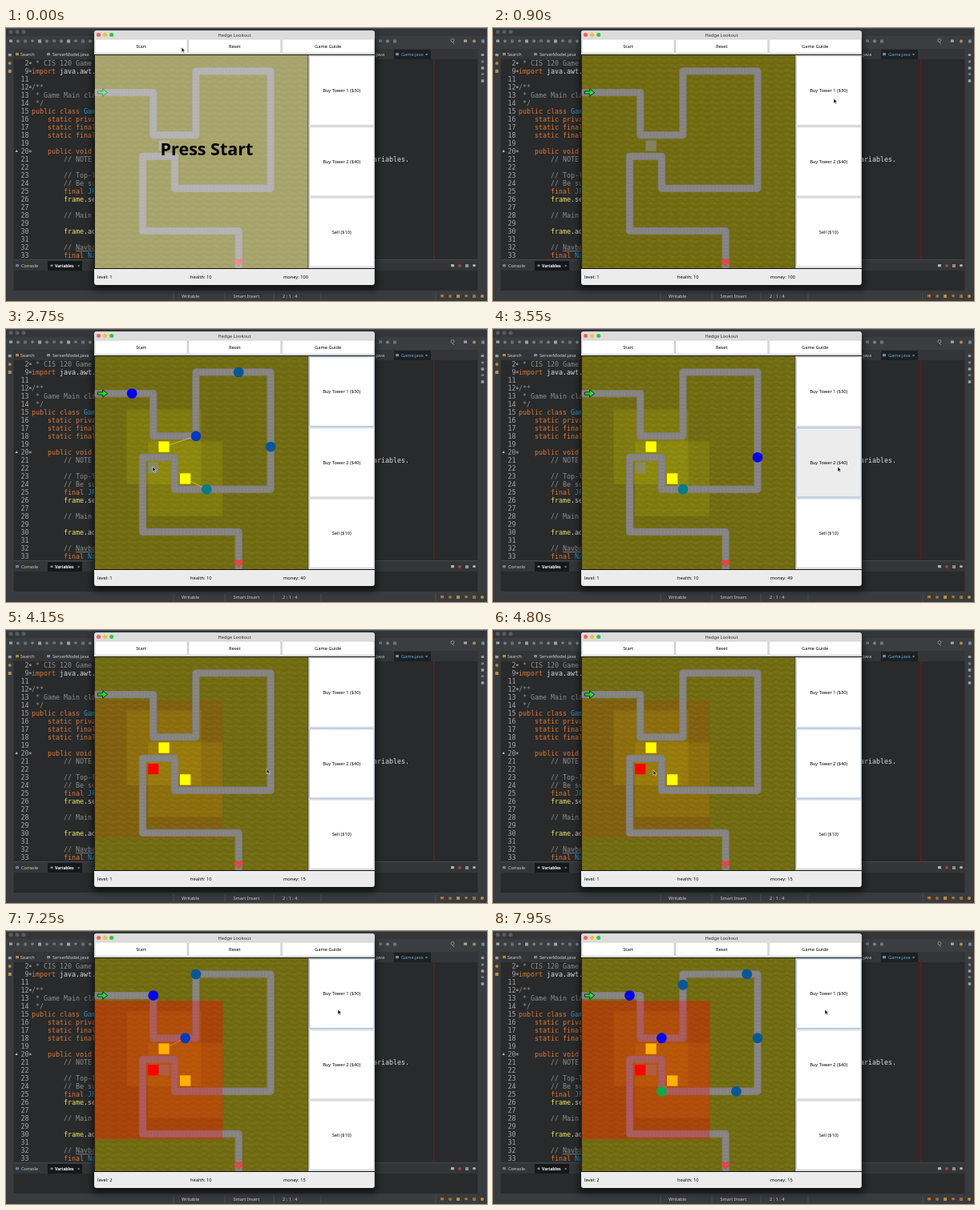
Animation, 600 px wide and 341 px high, one loop 8 s. Source, as an HTML page:

```html
<!DOCTYPE html>
<html lang="en">
<head>
<meta charset="utf-8">
<title>Hedge Lookout</title>
<style>
html, body { margin: 0; width: 100%; height: 100%; overflow: hidden; background: #292a2b; }
svg { display: block; width: 100vw; height: 100vh; }
text { font: 5.7px "Noto Sans", "Open Sans", sans-serif; white-space: pre; }
.code text { font: 8.3px "DejaVu Sans Mono", monospace; fill: #dcdcdc; }
.code .num { fill: #a6a9ab; text-anchor: end; }
.k { fill: #dd7a3a; } .t { fill: #2a9bcc; } .v { fill: #ece36c; } .c { fill: #8d8d8d; }
.ide text { fill: #d0d2d3; font-size: 5.6px; }
.mid { text-anchor: middle; }
#splash text { font: bold 21.5px "Noto Sans", "Open Sans", sans-serif; text-anchor: middle; }
</style>
</head>
<body>
<svg viewBox="0 0 600 341" preserveAspectRatio="none">
  <defs>
    <pattern id="grass" width="1" height="1" patternUnits="userSpaceOnUse">
      <rect width="1" height="1" fill="#736d13"/>
      <path d="M0 .2q.25 -.2 .5 0t.5 0M0 .7q.25 -.2 .5 0t.5 0" fill="none" stroke="#6a640f" stroke-width=".1"/>
      <path d="M.1 .45h.25M.6 .48h.25M.3 .93h.3" stroke="#7a7419" stroke-width=".1"/>
    </pattern>
    <filter id="blur" x="-10%" y="-10%" width="120%" height="120%"><feGaussianBlur stdDeviation="5"/></filter>
    <clipPath id="field"><rect width="20" height="20"/></clipPath>
  </defs>

  <g class="ide">
    <rect width="600" height="341" fill="#292a2b"/>
    <rect width="600" height="27" fill="#3b3e40"/>
    <rect width="600" height="10" fill="#343638"/>
    <rect width="600" height=".8" fill="#4a6180"/>
    <path d="M6 4.7h0M14 4.7h0M22 4.7h0" stroke="#5a5d5f" stroke-width="5" stroke-linecap="round"/>
    <rect y="26" width="600" height="13" fill="#333537"/>
    <rect x="484" y="27" width="46" height="12" fill="#1d2022"/>
    <rect y="26" width="9.5" height="303" fill="#393c3e"/>
    <rect x="588.5" y="26" width="11.5" height="303" fill="#393c3e"/>
    <rect x="533.3" y="39" width="1" height="251" fill="#7a1b1b"/>
    <rect x="9.5" y="289" width="579" height="1.5" fill="#45484a"/>
    <rect x="9.5" y="290.5" width="579" height="12.5" fill="#333537"/>
    <rect x="52" y="291" width="43" height="12" fill="#15181a"/>
    <rect y="328" width="600" height="13" fill="#393c3e"/>
    <path d="M209 330v10M273 330v10M334 330v10M393 330v10M536 330v10" stroke="#55585a" stroke-width=".7"/>
    <g id="icons"></g>
    <text x="18" y="35">Search</text>
    <text x="58" y="35">ServerModel.java</text>
    <text x="460" y="35">.java</text>
    <text x="493" y="35" style="fill:#5fb0de">Game.java</text>
    <text x="523" y="35">×</text>
    <text x="19" y="299">Console</text>
    <text x="61" y="299" style="font-weight:bold;fill:#fff;font-size:5.1px">Variables</text>
    <text x="89" y="299">×</text>
    <text x="219" y="336.7">Writable</text>
    <text x="283.5" y="336.7">Smart Insert</text>
    <text x="345" y="336.7">2 : 1 : 4</text>
  </g>
  <g class="code" id="code"></g>

  <rect x="108" y="8" width="354" height="319" rx="4" fill="#000" opacity=".55" filter="url(#blur)"/>
  <rect x="110" y="3.3" width="349.8" height="317.7" rx="3" fill="#ececec"/>
  <path d="M110 13V6.3q0 -3 3 -3H456.8q3 0 3 3V13Z" fill="#dcdcdc"/>
  <circle cx="115.5" cy="8.4" r="2.5" fill="#f95f57"/>
  <circle cx="123.5" cy="8.4" r="2.5" fill="#fbbd2e"/>
  <circle cx="131.7" cy="8.4" r="2.5" fill="#29c840"/>
  <text class="mid" x="285" y="10.6" fill="#333">Hedge Lookout</text>
  <g id="buttons"></g>
  <path d="M110 33.5H460M110 300.5H460M110.5 33V301M376.8 33V301" stroke="#111" fill="none"/>
  <text x="114" y="312.6" id="level"></text>
  <text x="230" y="312.6">health: 10</text>
  <text x="346" y="312.6" id="money"></text>

  <g transform="translate(110.6 34) scale(13.3)" clip-path="url(#field)">
    <rect width="20" height="20" fill="url(#grass)"/>
    <g id="ranges"></g>
    <g id="road" fill="none" stroke-linejoin="round"></g>
    <rect id="ghost" width="1" height="1" fill="#8a8a7c" opacity=".75"/>
    <path d="M.28 3.38H.76V3.15L1.2 3.5L.76 3.85V3.62H.28Z" fill="#22e232" stroke="#0a2c0a" stroke-width=".07"/>
    <path d="M13.5 19.82L13.12 19.4Q13.02 19.17 13.27 19.15Q13.45 19.15 13.5 19.33Q13.55 19.15 13.73 19.15Q13.98 19.17 13.88 19.4Z" fill="#ee4640" stroke="#b9403a" stroke-width=".05"/>
    <g id="lasers" stroke="#e6cb2c" stroke-width=".06"></g>
    <g id="towers"></g>
    <rect id="burst" x="-1" y="4" width="13" height="13" fill="#f00" opacity=".3"/>
    <rect id="redTower" x="5" y="10" width="1" height="1" fill="#f00"/>
    <g id="enemies"></g>
  </g>
  <g id="splash">
    <rect x="111" y="34" width="265.3" height="266" fill="#fff" opacity=".38"/>
    <text x="250.5" y="159">Press Start</text>
  </g>
  <path id="cursor" d="M0 0V6.2L1.5 4.9L2.5 7.1L3.5 6.6L2.5 4.6H4.4Z" fill="#000" stroke="#fff" stroke-width=".6"/>
</svg>
<script>
const LOOP = 8000, FRAME = 50, CELL_MS = 25.8;
const byId = id => document.getElementById(id);

function add(parent, tag, attrs, text) {
  const el = document.createElementNS('http://www.w3.org/2000/svg', tag);
  for (const name in attrs) el.setAttribute(name, attrs[name]);
  if (text !== undefined) el.textContent = text;
  parent.append(el);
  return el;
}
const set = (el, attrs) => { for (const name in attrs) el.setAttribute(name, attrs[name]); };
const show = (el, on) => el.setAttribute('visibility', on ? 'visible' : 'hidden');

// Editor text: "class:text" pieces separated by "|".
const lines = [
  [2, 'c: * CIS 120 Game'], [9, 'k:import| java.awt.'], [11, ''], [12, 'c:/**'],
  [13, 'c: * Game Main clas'], [14, 'c: */'], [15, 'k:public class |t:Gam'],
  [16, 'k:    static priva'], [17, 'k:    static final'], [18, 'k:    static final'], [19, ''],
  [20, 'k:    public void'], [21, 'c:        // NOTE'], [22, ''], [23, 'c:        // Top-l'],
  [24, 'c:        // Be su'], [25, 'k:        final |t:JF'], [26, 'v:        frame|.se'], [27, ''],
  [28, 'c:        // Main'], [29, ''], [30, 'v:        frame|.ad'], [31, ''],
  [32, 'c:        // |u:Navba'], [33, 'k:        final |t:Na']
];
lines.forEach(([number, source], row) => {
  const y = 46.8 + row * 10.02;
  add(byId('code'), 'text', { class: 'num', x: 28.6, y }, number);
  if ([2, 9, 12, 20].includes(number))
    add(byId('code'), 'circle', { cx: 30.3, cy: y - 3, r: 1.4, fill: '#8f9294' });
  const line = add(byId('code'), 'text', { x: 32, y });
  for (const piece of source.split('|')) {
    const [, kind, text] = piece.match(/^(?:([ktvcu]):)?(.*)$/);
    const span = add(line, 'tspan', { class: kind === 'u' ? 'c' : kind || '' }, text);
    if (kind === 'u') span.setAttribute('text-decoration', 'underline');
  }
});
add(byId('code'), 'text', { x: 503, y: 167, 'text-anchor': 'end', class: 'c' }, 'ariables.');
add(byId('code'), 'path', { d: 'M11.5 155l1.7 -3l1.7 3Z', fill: '#b9bcbd' });

function iconRow(x, y, count, dx, dy, colors, size = 4) {
  for (let i = 0; i < count; i++)
    add(byId('icons'), 'rect', {
      x: x + i * dx - size / 2, y: y + i * dy - size / 2, width: size, height: size * (i % 3 ? 1 : .8),
      rx: i % 2 ? 2 : .5, fill: colors[i % colors.length], opacity: .8
    });
}
iconRow(6, 16.5, 12, 9, 0, ['#b8bcc0', '#85898c', '#75797c', '#8d9194']);
iconRow(467, 16.5, 3, 9, 0, ['#7d8184', '#8d9194']);
iconRow(573, 16.5, 3, 11, 0, ['#b9bcbf', '#c9a45c', '#6f9fc9']);
add(byId('icons'), 'path', { d: 'M557 18l2 2M555 15.5a2 2 0 1 0 4 0a2 2 0 1 0 -4 0', fill: 'none', stroke: '#999', 'stroke-width': .8 });
iconRow(4.8, 34, 3, 0, 10, ['#b5b8ba', '#c79b50', '#d0a85c']);
iconRow(594.5, 34, 5, 0, 8, ['#b5b8ba', '#6d97bb'], 3.5);
iconRow(14, 33, 1, 0, 0, ['#d0a03f']);
iconRow(53, 33, 1, 0, 0, ['#86a7c4']);
iconRow(488, 33, 1, 0, 0, ['#86a7c4']);
iconRow(14, 297, 1, 0, 0, ['#6d97bb']);
iconRow(57, 297, 1, 0, 0, ['#a5a8aa'], 3);
iconRow(557, 297, 4, 9, 0, ['#d0d2d3', '#b04c45', '#a5a8aa']);
iconRow(544, 335, 6, 10, 0, ['#d8822c', '#b9793c', '#e0a33b']);

// Game window buttons.
function button(x, y, width, height, label) {
  const face = add(byId('buttons'), 'rect', { x, y, width, height, rx: 1, fill: '#fff', stroke: '#c4c4c4', 'stroke-width': .9 });
  add(byId('buttons'), 'text', { class: 'mid', x: x + width / 2, y: y + height / 2 + 2 }, label);
  return face;
}
const start = button(111, 13.9, 115.3, 17.6, 'Start');
button(227.6, 13.9, 115.3, 17.6, 'Reset');
button(344.2, 13.9, 115, 17.6, 'Game Guide');
const buyOne = button(378.3, 35, 80.8, 86.5, 'Buy Tower 1 ($30)');
const buyTwo = button(378.3, 123.5, 80.8, 86.5, 'Buy Tower 2 ($40)');
button(378.3, 212, 80.8, 86.5, 'Sell ($10)');

// Road corners in cells, expanded to every cell along the way.
const corners = [[0, 3], [5, 3], [5, 7], [9, 7], [9, 1], [16, 1], [16, 12], [7, 12], [7, 9], [4, 9], [4, 16], [13, 16], [13, 19]];
const cells = [corners[0]];
for (const [x, y] of corners.slice(1)) {
  let [cx, cy] = cells[cells.length - 1];
  while (cx !== x || cy !== y) cells.push([cx += Math.sign(x - cx), cy += Math.sign(y - cy)]);
}
const roadPoints = [[-.5, 3], ...corners, [13, 19.5]].map(([x, y]) => `${x + .5},${y + .5}`).join(' ');
[['#7d7a78', .7, 'none'], ['#85827f', .6, 'none'], ['#8a8788', .46, '.14 .19']].forEach(([stroke, width, dash]) =>
  add(byId('road'), 'polyline', { points: roadPoints, stroke, 'stroke-width': width, 'stroke-dasharray': dash }));

const towers = [
  { x: 6, y: 8, reach: 3, at: 1000, color: '#ff0' },
  { x: 8, y: 11, reach: 3, at: 1950, color: '#ff0' },
  { x: 5, y: 10, reach: 6, at: 3650, color: '#f00' }
];
for (const tower of towers) {
  const { x, y, reach, color } = tower, side = 2 * reach + 1;
  tower.range = add(byId('ranges'), 'rect', { x: x - reach, y: y - reach, width: side, height: side, fill: color, opacity: .1 });
  tower.body = reach > 3 ? byId('redTower') : add(byId('towers'), 'rect', { x, y, width: 1, height: 1, fill: color });
  tower.laser = add(byId('lasers'), 'line', {});
}
const inRange = (tower, [x, y]) => Math.max(Math.abs(x - tower.x), Math.abs(y - tower.y)) <= tower.reach;

const waves = [
  { at: 1633, gap: 10, count: 5 },
  { at: 6749.5, gap: 7, count: 8 }
];
const DEATH = 50;
const dots = Array.from({ length: 8 }, () => add(byId('enemies'), 'circle', { r: .48 }));

function enemyColor(step, fresh) {
  if (step < 12 || fresh && step < 42) return '#0202ea';
  if (step < 14) return '#0838bc';
  if (step < 42) return '#085796';
  return step < 46 ? '#057c86' : '#10a94a';
}

const cursorStops = [
  [0, 219, 24], [150, 219, 24], [400, 200, 22], [530, 200, 22], [900, 425, 88], [1080, 425, 88],
  [1420, 222, 185], [1530, 222, 185], [1830, 437, 97], [2050, 437, 97], [2650, 183, 172],
  [2850, 183, 172], [3450, 430, 172], [3750, 430, 172], [4600, 200, 175], [4980, 200, 175],
  [5650, 414, 98], [LOOP, 414, 98]
];
function cursorAt(t) {
  const i = cursorStops.findIndex(stop => stop[0] > t);
  const [t0, x0, y0] = cursorStops[i - 1], [t1, x1, y1] = cursorStops[i];
  const p = (t - t0) / (t1 - t0), e = p * p * (3 - 2 * p);
  return [x0 + (x1 - x0) * e, y0 + (y1 - y0) * e];
}

const ghostStops = [[0, 6, 8], [1500, 8, 11], [2750, 5, 10], [4900, 6, 10]];
const during = (t, from, to) => t >= from && t < to;

function paintButton(face, pressed, focused) {
  set(face, { fill: pressed ? '#ececec' : '#fff', stroke: focused ? '#8fb2dc' : '#c4c4c4' });
}

function render(t) {
  const secondWave = t >= 6700;
  const wave = waves[secondWave ? 1 : 0];
  const lead = Math.floor((t - wave.at) / CELL_MS);
  let kills = 0;
  const alive = [];
  dots.forEach((dot, i) => {
    const step = lead - i * wave.gap;
    const dead = step >= DEATH, visible = i < wave.count && step >= 0 && !dead;
    show(dot, visible);
    if (i < wave.count && dead) kills++;
    if (!visible) return;
    const [x, y] = cells[step];
    alive.push(cells[step]);
    set(dot, { cx: x + .5, cy: y + .5, fill: enemyColor(step, !secondWave && i === 4) });
  });

  for (const tower of towers) {
    const built = t >= tower.at;
    const target = built && alive.find(cell => inRange(tower, cell));
    show(tower.range, built);
    show(tower.body, built);
    show(tower.laser, target && tower.reach === 3);
    if (target) set(tower.laser, { x1: tower.x + .5, y1: tower.y + .5, x2: target[0] + .5, y2: target[1] + .5 });
    if (tower.reach > 3) show(byId('burst'), target && secondWave);
  }

  const [, gx, gy] = ghostStops.filter(stop => stop[0] <= t).pop();
  set(byId('ghost'), { x: gx, y: gy });
  const spent = (t >= 1000) * 30 + (t >= 1950) * 30 + (t >= 3650) * 40;
  byId('level').textContent = 'level: ' + (secondWave ? 2 : 1);
  byId('money').textContent = 'money: ' + (100 - spent + 3 * (secondWave ? 5 : kills));

  paintButton(start, during(t, 400, 500), false);
  paintButton(buyOne, during(t, 950, 1050) || during(t, 1900, 2000), during(t, 950, 3500) || t >= 5800);
  paintButton(buyTwo, during(t, 3500, 3650), during(t, 3500, 5800));
  show(byId('splash'), t < 500);
  byId('cursor').setAttribute('transform', `translate(${cursorAt(t)})`);
}

function tick() {
  render(Math.floor(performance.now() % LOOP / FRAME) * FRAME);
  requestAnimationFrame(tick);
}
tick();
</script>
</body>
</html>
```
